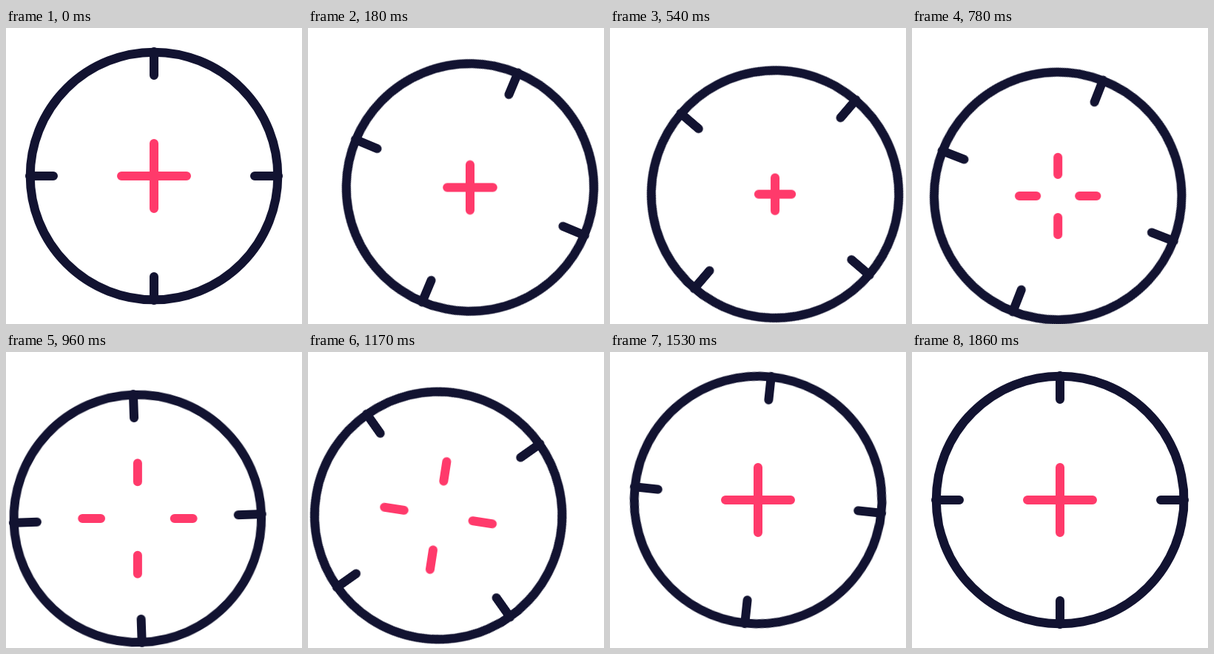
Recreate the animation shown at these times as an HTML page. Size 400 by 400 pixels, loop 1890 ms.

```html
<!DOCTYPE html>
<html lang="en">
<head>
<meta charset="utf-8">
<title>Crosshair</title>
<style>
  html, body {
    margin: 0;
    width: 100%;
    height: 100%;
    overflow: hidden;
    background: #fff;
  }

  .scope, .ring, .cross, .arms {
    animation: 1890ms cubic-bezier(.333, 0, .667, 1) infinite;
  }

  /* Zero-sized carrier: its centre follows a rounded triangle */
  .scope {
    position: absolute;
    left: 0;
    top: 0;
    width: 0;
    height: 0;
    offset-path: path("M200 200C204 204 228 220 224 224C220 228 180 228 176 224C172 220 196 204 200 200");
    offset-rotate: 0deg;
    animation-name: travel;
  }

  svg {
    position: absolute;
    left: 0;
    top: 0;
    width: 1px;
    height: 1px;
    overflow: visible;
    fill: none;
    stroke-width: 12;
    stroke-linecap: round;
  }

  .ring { stroke: #121331; animation-name: swing; }
  .cross { stroke: #ff3a6b; animation-name: turn; }
  .arms { animation-name: spread; }
  .ring, .cross { transform-origin: 0 0; }

  @keyframes travel {
    0% { offset-distance: 0%; }
    15.08%, 26.19% { offset-distance: 29.58%; }
    54.29%, 57.67% { offset-distance: 70.42%; }
    79.89%, 100% { offset-distance: 100%; }
  }

  @keyframes swing {
    0% { transform: rotate(0deg); }
    19.05% {
      transform: rotate(45deg);
      animation-timing-function: cubic-bezier(.4, 0, .7, .565);
    }
    69.84% {
      transform: rotate(-59.5deg);
      animation-timing-function: cubic-bezier(.2, .57, .3, 1);
    }
    98.41%, 100% { transform: rotate(-90deg); }
  }

  @keyframes turn {
    0%, 57.67% { transform: rotate(0deg); }
    79.89%, 100% { transform: rotate(90deg); }
  }

  @keyframes spread {
    0%, 79.89%, 100% { d: path("M0 0L0 -44M0 0L44 0M0 0L0 44M0 0L-44 0"); }
    17.46%, 26.19% { d: path("M0 0L0 -21M0 0L21 0M0 0L0 21M0 0L-21 0"); }
    54.29%, 57.67% { d: path("M0 -52L0 -77M52 0L77 0M0 52L0 77M-52 0L-77 0"); }
  }
</style>
</head>
<body>
<div class="scope">
  <svg>
    <g class="ring">
      <circle r="167.3"/>
      <path d="M0 -168V-136M168 0H136M0 168V136M-168 0H-136"/>
    </g>
    <g class="cross">
      <path class="arms" d="M0 0L0 -44M0 0L44 0M0 0L0 44M0 0L-44 0"/>
    </g>
  </svg>
</div>
</body>
</html>
```
